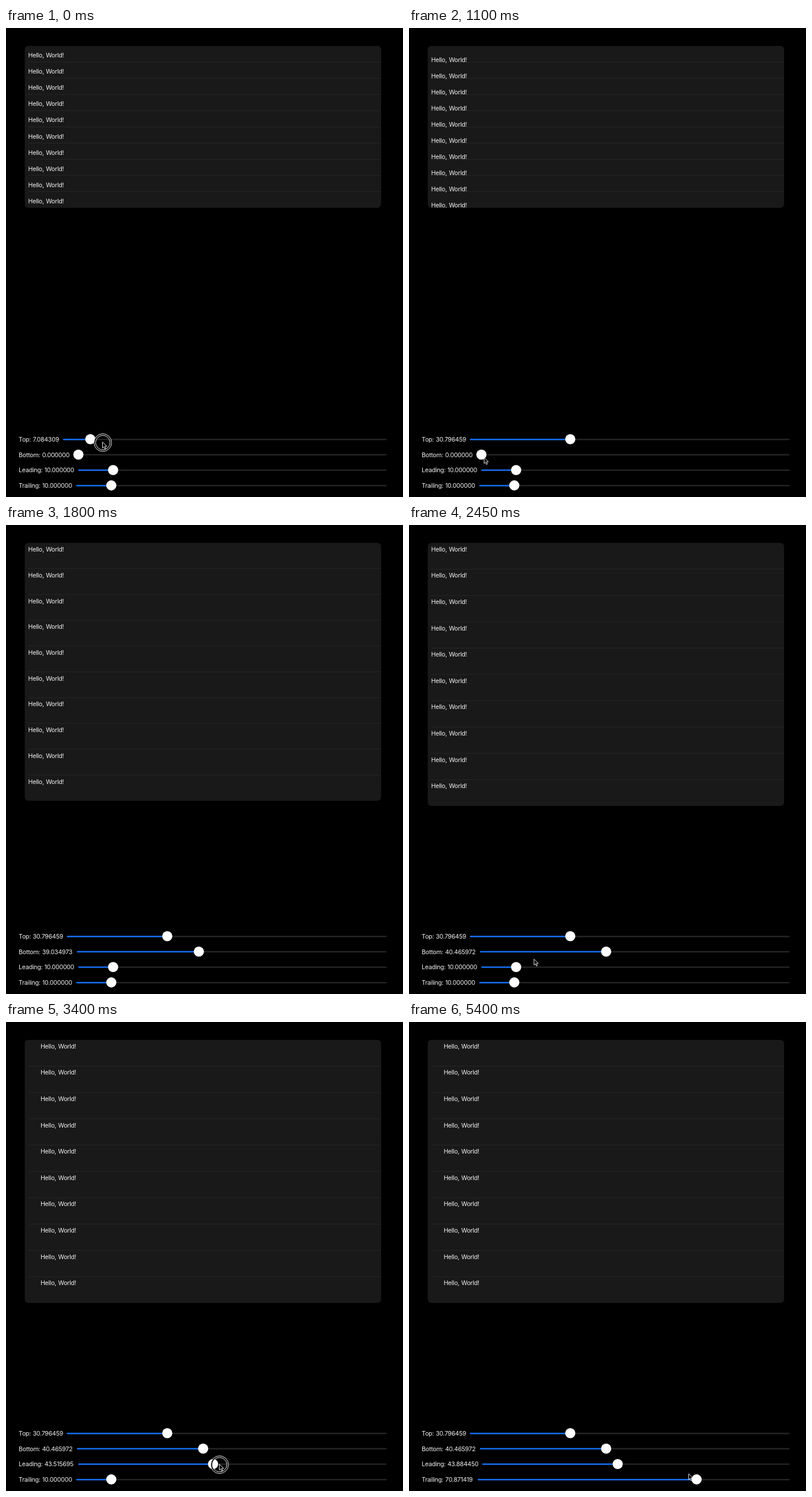
Recreate the animation shown at these times as an HTML page. Size 689 px wide and 813 px high, loop 5.5 s.

```html
<!DOCTYPE html>
<html lang="en">
<head>
<meta charset="utf-8">
<title>List row insets</title>
<style>
  html, body { margin: 0; width: 100%; height: 100%; overflow: hidden; background: #000; }
  svg { display: block; width: 689px; height: 813px; }
  text { font: 10.7px Inter, "Liberation Sans", sans-serif; letter-spacing: -.28px; word-spacing: .7px; fill: #f0f0f0; white-space: pre; }
  .card { fill: #191919; }
  .sep { fill: #2b2b2c; }
  .rail { fill: #242425; }
  .fill { fill: #126cf0; }
  .knob { fill: #fff; }
  .ring { fill: none; stroke: #f0f0f0; }
  .gap { fill: none; stroke: #000; stroke-width: 2.4; }
  .arrow { fill: #000; stroke: #fff; stroke-width: .9; stroke-linejoin: round; }
</style>
</head>
<body>
<svg viewBox="0 0 689 813">
  <clipPath id="clip"><rect id="clipBox" x="32.5" y="31" width="618.5" height="281" rx="6.4"/></clipPath>
  <g id="list" clip-path="url(#clip)"><rect class="card" x="32" y="31" width="619" height="782"/></g>
  <g id="sliders"></g>
  <g id="pointer">
    <g id="touch">
      <circle class="gap" cx=".5" cy="1" r="14"/>
      <circle class="ring" cx=".5" cy="1" r="15.3"/>
      <circle class="ring" cx=".5" cy="1" r="12.5"/>
    </g>
    <path class="arrow" d="M0 0V10.4L2.4 8.2 4 12 5.8 11.2 4.2 7.5H7.5Z"/>
  </g>
</svg>
<script>
const LOOP = 5500, STEP = 50;
const PT = 0.638;             // pixels per point
const TOP = 31, ROWS = 10, MIN_ROW = 28.07;
const RAIL_END = 660.5, KNOB = 8.8;
const FIRST_Y = 713, ROW_GAP = 26.7;
const LEAD = 30;              // ms the pointer runs ahead of the knob

const clamp = u => Math.min(1, Math.max(0, u));
const easeOut = u => 1 - (1 - u) ** 2;
const smooth = u => u * u * (3 - 2 * u);
const mix = (a, b, u) => a + (b - a) * u;

// base: rail start without digits; move: value change; hold: finger down; grab: pointer offset from knob
const sliders = [
  { name: 'Top', base: 53, from: 7.084309, to: 30.796459, move: [0, 400], hold: [0, 400], grab: [0, 4.7], ease: easeOut },
  { name: 'Bottom', base: 70.3, from: 0, to: 40.465972, move: [1250, 1870], hold: [1250, 1750], grab: [3, 1], ease: smooth },
  { name: 'Leading', base: 73.8, from: 10, to: 43.88445, move: [2988, 3427], hold: [2950, 3450], grab: [8, 0], ease: smooth },
  { name: 'Trailing', base: 70.3, from: 10, to: 70.871419, move: [4040, 4410], hold: [4000, 4350], grab: [5, 4], ease: smooth }
];

// [time, x, y] where the free pointer turns or rests
const stops = [
  [400, 280, 718], [700, 172, 782], [1100, 130.3, 744.5], [1250, 128, 741],
  [2250, 309, 742], [2650, 125, 763], [2950, 193, 766], [3450, 371, 767], [4000, 187, 797],
  [4400, 503.8, 799], [4650, 503.8, 799], [4850, 526, 798], [5400, 485.3, 783]
];
const isHidden = t => t > 1750 && t < 2250;

const $ = id => document.getElementById(id);
function set(el, attrs) {
  for (const k in attrs) el.setAttribute(k, attrs[k]);
}
function add(parent, tag, attrs) {
  const el = document.createElementNS('http://www.w3.org/2000/svg', tag);
  set(el, attrs);
  return parent.appendChild(el);
}

const rows = Array.from({ length: ROWS }, (_, i) => {
  const sep = i < ROWS - 1 && add($('list'), 'rect', { class: 'sep', x: 39, width: 612, height: .7 });
  const label = add($('list'), 'text', {});
  label.textContent = 'Hello, World!';
  return { sep, label };
});

sliders.forEach((s, i) => {
  const g = $('sliders');
  s.y = FIRST_Y + ROW_GAP * i;
  s.label = add(g, 'text', { x: 22.1, y: s.y + 3.9 });
  const bar = { y: s.y - 1.1, height: 2.5, rx: 1.25 };
  s.rail = add(g, 'rect', { class: 'rail', ...bar });
  s.fill = add(g, 'rect', { class: 'fill', ...bar });
  s.knob = add(g, 'circle', { class: 'knob', cy: s.y - .2, r: KNOB });
});

function valueAt(s, t) {
  const [start, end] = s.move;
  return mix(s.from, s.to, s.ease(clamp((t - start) / (end - start))));
}

// The rail begins after its label, so it depends on the digits shown.
const digitWidth = c => c === '.' ? 0 : c === '1' ? 5 : c === '7' ? 6.1 : 6.65;
function layout(s, value) {
  const digits = value.toFixed(6);
  const x = [...digits].reduce((sum, c) => sum + digitWidth(c), s.base);
  const cx = x + KNOB + value / 100 * (RAIL_END - x - 2 * KNOB);
  return { digits, x, cx };
}

function drawSlider(s, value) {
  const { digits, x, cx } = layout(s, value);
  s.label.textContent = s.name + ': ' + digits;
  set(s.rail, { x, width: RAIL_END - x });
  set(s.fill, { x, width: cx - x });
  set(s.knob, { cx });
}

function drawList(top, bottom, leading) {
  const h = Math.max(MIN_ROW, (top + bottom) * .64);
  const baseline = TOP + MIN_ROW / 2 + (top - bottom) * PT / 2 + 3.9;
  set($('clipBox'), { height: h * ROWS });
  rows.forEach(({ sep, label }, i) => {
    if (sep) set(sep, { y: TOP + h * (i + 1) - .4 });
    set(label, { x: 32.2 + leading * PT, y: baseline + h * i });
  });
}

function freePointer(t) {
  const n = stops.findIndex(p => p[0] > t);
  if (n < 0) return stops[stops.length - 1].slice(1);
  const a = stops[n - 1], b = stops[n];
  const u = smooth((t - a[0]) / (b[0] - a[0]));
  return [mix(a[1], b[1], u), mix(a[2], b[2], u)];
}

function drawPointer(t) {
  const held = sliders.find(s => t >= s.hold[0] && t <= s.hold[1]);
  const [x, y] = held
    ? [layout(held, valueAt(held, t + LEAD)).cx + held.grab[0], held.y + held.grab[1]]
    : freePointer(t);
  set($('pointer'), {
    transform: `translate(${x} ${y})`,
    visibility: isHidden(t) ? 'hidden' : 'visible'
  });
  set($('touch'), { display: held ? 'inline' : 'none' });
}

function draw(t) {
  const values = sliders.map(s => valueAt(s, t));
  sliders.forEach((s, i) => drawSlider(s, values[i]));
  drawList(...values);
  drawPointer(t);
}

const start = performance.now();
function tick() {
  const t = (performance.now() - start) % LOOP;
  draw(Math.min(Math.floor(t / STEP) * STEP, LOOP - 2 * STEP));
  requestAnimationFrame(tick);
}
tick();
</script>
</body>
</html>
```
